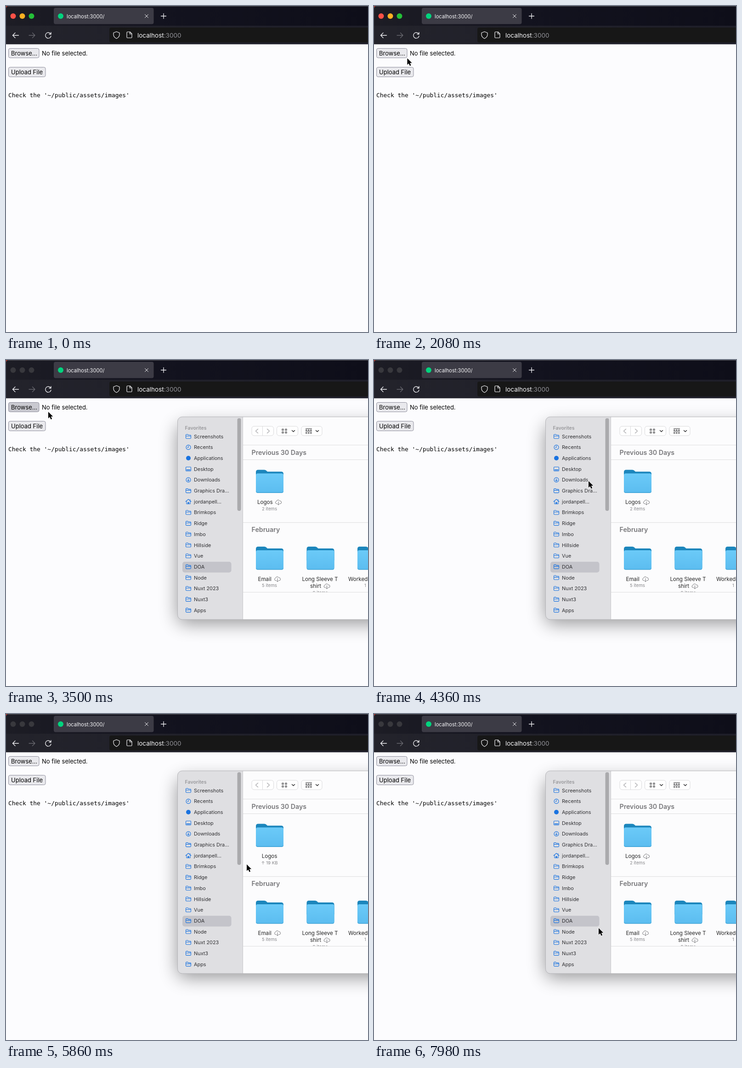
These frames come from a looping animation (788x711 px, 8 s). An HTML page:

```html
<!DOCTYPE html>
<html lang="en">
<head>
<meta charset="utf-8">
<title>File upload</title>
<style>
  html, body { margin: 0; width: 100%; height: 100%; overflow: hidden; background: #fcfcfe; }
  svg { display: block; width: 788px; height: 711px; font-family: Inter, "Open Sans", sans-serif; }
  text { white-space: pre; }
  .line { fill: none; stroke-linecap: round; stroke-linejoin: round; }
  .button { fill: #e9e9ed; stroke: #8f8f9d; }
  .label { font-size: 11.6px; fill: #262626; }
  .detail { font-size: 9.6px; fill: #858588; text-anchor: middle; }
  .heading { font-size: 14.2px; font-weight: 600; fill: #77777a; }
  .blue { stroke: #1a73e0; stroke-width: 1.1; }
  .rule { stroke: #dededf; }
</style>
</head>
<body>
<svg viewBox="0 0 788 711" xmlns="http://www.w3.org/2000/svg">
  <defs>
    <linearGradient id="strip"><stop stop-color="#1d1d25"/><stop offset=".4" stop-color="#13131f"/><stop offset="1" stop-color="#0e0e19"/></linearGradient>
    <linearGradient id="toolbar"><stop stop-color="#23232b"/><stop offset="1" stop-color="#1e1e29"/></linearGradient>
    <linearGradient id="front" x2="0" y2="1"><stop stop-color="#6bcaf8"/><stop offset="1" stop-color="#5cbdf0"/></linearGradient>
    <filter id="shadow" x="-30%" y="-30%" width="160%" height="170%"><feGaussianBlur stdDeviation="20"/></filter>
    <clipPath id="panelClip"><rect x="373.5" y="124" width="520" height="442" rx="10"/></clipPath>
    <clipPath id="listClip"><rect x="516" y="218" width="272" height="288"/></clipPath>
    <g id="folder">
      <path d="M0 5Q0 0 5 0H18Q21 0 23 2L25 4H55Q60 4 60 9V30H0Z" fill="#1c86bc"/>
      <rect y="8" width="60" height="42.5" rx="4" fill="#3ba2d6"/>
      <rect y="8" width="60" height="41" rx="4" fill="url(#front)"/>
    </g>
    <g id="cloud" class="line" stroke="#77777a">
      <path d="M4 9.5H3A2.7 2.7 0 0 1 2.6 4.2A4 4 0 0 1 10 3.4A3 3 0 0 1 11 9.5H10M7 5V12M5 10L7 12L9 10"/>
    </g>
    <g id="smallFolder" class="line blue">
      <path d="M-5.5 3.5V-3Q-5.5 -4.5 -4 -4.5H-1.5L0 -3H4Q5.5 -3 5.5 -1.5V3Q5.5 4.5 4 4.5H-4Q-5.5 4.5 -5.5 3ZM-5.5 -.7H5.5"/>
    </g>
    <g id="clock" class="line blue"><circle r="5"/><path d="M0 -3V.3H-2.5"/></g>
    <circle id="apps" r="5" fill="#1a73e0"/>
    <g id="desktop" class="line blue"><rect x="-5.5" y="-4.5" width="11" height="9" rx="1.5"/><path d="M-3.5 2H3.5" stroke-width="2"/></g>
    <g id="download" class="line blue"><circle r="5"/><path d="M0 -2.5V2.5M-2 .7L0 2.6L2 .7"/></g>
    <g id="home" class="line blue"><path d="M-6 0L0 -5L6 0M-4 -1V5H4V-1M3.7 -2V-4.5"/><path d="M-1 5V1.5H1V5" fill="#1a73e0"/></g>
  </defs>

  <rect width="788" height="711" fill="#fcfcfe"/>

  <g id="browser">
    <rect width="788" height="43" fill="url(#strip)"/>
    <rect y="43" width="788" height="40.5" fill="url(#toolbar)"/>
    <path d="M0 .5H788" stroke="#55555a"/>
    <path d="M0 0H5Q1 1 0 5Z" fill="#a33a35"/>
    <g id="lights"><circle cx="15.5" cy="22" r="6"/><circle cx="35.5" cy="22" r="6"/><circle cx="55.5" cy="22" r="6"/></g>
    <rect x="104" y="4" width="217.5" height="35.5" rx="4" fill="#3c3b45"/>
    <circle cx="119" cy="22" r="6" fill="#00d47e"/>
    <text x="132" y="26.5" font-size="11.1" fill="#f8f8fa">localhost:3000/</text>
    <g class="line" stroke="#f2f2f5" stroke-width="1.3">
      <path d="M302.5 18.5L309.5 25.5M309.5 18.5L302.5 25.5" stroke-width="1"/>
      <path d="M337.5 22H348.5M343 16.5V27.5"/>
      <path d="M27.5 64H14.5M20 58.5L14.5 64L20 69.5"/>
      <path d="M50 64H63M57.500 58.5L63 64L57.500 69.5" stroke="#68686f"/>
      <path d="M97.3 61A6.2 6.2 0 1 0 98 65.500M98 57.5V61.5H94"/>
    </g>
    <rect x="225" y="47" width="570" height="32.5" rx="4" fill="#171717"/>
    <g class="line" stroke="#f0f0f2" stroke-width="1.2">
      <path d="M240.500 56L247 58.5V63Q246.500 68 240.500 71Q234.500 68 234 63V58.500Z"/>
      <path d="M264.500 56.500H270L274 60.500V68Q274 69.500 272.500 69.500H264.500Q263 69.500 263 68V58Q263 56.500 264.500 56.500ZM269.500 57V61H273.500"/>
    </g>
    <text x="286" y="68.5" font-size="13.5" fill="#f8f8fa">localhost<tspan fill="#929298">:3000</tspan></text>
  </g>

  <g id="page" font-size="13" fill="#000">
    <rect id="browse" class="button" x="5.500" y="92.500" width="66.500" height="20.500" rx="3.5"/>
    <text x="11" y="107.500">Browse...</text>
    <text x="78" y="107.500">No file selected.</text>
    <rect class="button" x="5.500" y="133.500" width="80.500" height="21" rx="3.5"/>
    <text x="11" y="149">Upload File</text>
    <text x="5" y="199" font-family="'DejaVu Sans Mono', monospace" font-size="12.9">Check the '~/public/assets/images'</text>
  </g>

  <g id="dialog">
    <rect x="374" y="142" width="520" height="432" rx="12" fill="#000" opacity=".42" filter="url(#shadow)"/>
    <g clip-path="url(#panelClip)">
      <rect x="373" y="124" width="143" height="442" fill="#dfdfe2"/>
      <rect x="516" y="124" width="380" height="442" fill="#fcfcfd"/>
      <path d="M515.500 124V566" stroke="#c9c9cb"/>
      <rect x="503.500" y="127" width="8" height="202" rx="4" fill="#aaaaad"/>
      <text x="389.500" y="152" font-size="10.6" font-weight="600" fill="#98989b">Favorites</text>
      <rect x="384" y="440" width="106.500" height="23.500" rx="5" fill="#c4c4ca"/>
      <g id="sidebar" font-size="10.9" fill="#303033"></g>
      <path class="rule" d="M516 185.500H788M516 217.500H788M516 354.500H788M516 506.500H788"/>
      <g fill="#fff" stroke="#dadadc">
        <rect x="535" y="144.500" width="47.500" height="20.500" rx="5"/>
        <rect x="589.500" y="144.500" width="46" height="20.500" rx="5"/>
        <rect x="643" y="144.500" width="45" height="20.500" rx="5"/>
        <path d="M558.500 145V165"/>
      </g>
      <g class="line" stroke="#3c3c3e" stroke-width="1.3">
        <path d="M548.500 150.500L543.500 155L548.500 159.500M568.500 150.500L573.500 155L568.500 159.500" stroke="#a8a8ab"/>
        <path d="M622.500 153.500L625.500 156.500L628.500 153.500M674.500 153.500L677.500 156.500L680.500 153.500" stroke-width="1.6"/>
        <path d="M601 150.500H604V153.500H601ZM608 150.500H611V153.500H608ZM601 156.500H604V159.500H601ZM608 156.500H611V159.500H608Z" stroke-width="1.1"/>
        <path d="M652.500 149.500H665.500M652.500 155.500H665.500" stroke-width="1"/>
        <path d="M653 152H655V153.500H653ZM658 152H660V153.500H658ZM663 152H665V153.500H663ZM653 158H655V160H653ZM658 158H660V160H658ZM663 158H665V160H663Z" stroke-width="1"/>
      </g>
      <text class="heading" x="534.500" y="207">Previous 30 Days</text>
      <g clip-path="url(#listClip)">
        <use href="#folder" x="544" y="239.500"/>
        <g id="idle">
          <text class="label" x="547" y="314">Logos</text>
          <use href="#cloud" x="586" y="304"/>
          <text class="detail" x="573.500" y="327.500">2 items</text>
        </g>
        <g id="syncing">
          <text class="label" x="573.500" y="314" text-anchor="middle">Logos</text>
          <text class="detail" x="573.500" y="327.500">↑ 19 KB</text>
        </g>
        <text class="heading" x="534.500" y="374.500">February</text>
        <use href="#folder" x="544" y="407"/>
        <use href="#folder" x="654.500" y="407"/>
        <use href="#folder" x="765" y="407"/>
        <text class="label" x="548.500" y="481.500">Email</text>
        <use href="#cloud" x="584" y="471.500"/>
        <text class="detail" x="573.500" y="495">5 items</text>
        <text class="label" x="644.500" y="481.500">Long Sleeve T</text>
        <text class="label" x="662" y="497">shirt</text>
        <use href="#cloud" x="691.500" y="487"/>
        <text class="detail" x="684" y="511">9 items</text>
        <text class="label" x="745" y="481.500">Worked</text>
        <text class="detail" x="782" y="495">1</text>
      </g>
    </g>
    <rect x="373.500" y="124" width="520" height="442" rx="10" fill="none" stroke="#b4b4b8"/>
  </g>

  <path id="cursor" d="M0 0V14.200L3.300 11.200L5.600 16.600L8.100 15.500L5.800 10.300H10.200Z" fill="#000" stroke="#fff" stroke-width="1.2" paint-order="stroke"/>
</svg>
<script>
const LOOP = 8000;
const $ = id => document.getElementById(id);

const favorites = [
  ["Screenshots"], ["Recents", "clock"], ["Applications", "apps"], ["Desktop", "desktop"],
  ["Downloads", "download"], ["Graphics Dra..."], ["jordanpell...", "home"], ["Brimkops"],
  ["Ridge"], ["Imbo"], ["Hillside"], ["Vue"], ["DOA"], ["Node"], ["Nuxt 2023"], ["Nuxt3"], ["Apps"]
];
$("sidebar").innerHTML = favorites.map(([name, icon = "smallFolder"], i) => {
  const y = 166.7 + i * 23.68;
  return `<use href="#${icon}" x="397" y="${y}"/><text x="409" y="${y + 4}">${name}</text>`;
}).join("");

// Pointer stops: time, x, y
const stops = [
  [680, -14, 240], [840, 16, 227], [1100, 136, 165], [1280, 113, 130], [1560, 93, 119],
  [1900, 84, 120], [2300, 57, 106], [3460, 57, 106], [3500, 92, 113], [4140, 467, 264],
  [4500, 467, 264], [5300, 524, 328], [6500, 524, 328], [7500, 489, 467], [LOOP, 489, 467]
];
const lightColors = ["#ff5147", "#ffb022", "#24c038"];

const clamp = v => Math.min(1, Math.max(0, v));
const ease = v => v * v * (3 - 2 * v);
const between = (t, start, end) => t >= start && t < end;
const show = (id, visible) => $(id).setAttribute("visibility", visible ? "visible" : "hidden");

function pointerAt(t) {
  const next = Math.max(1, stops.findIndex(s => s[0] > t));
  const [t0, x0, y0] = stops[next - 1], [t1, x1, y1] = stops[next];
  const k = ease(clamp((t - t0) / (t1 - t0)));
  return [x0 + (x1 - x0) * k, y0 + (y1 - y0) * k];
}

function draw(t) {
  const [x, y] = pointerAt(t);
  $("cursor").setAttribute("transform", `translate(${x} ${y})`);
  show("cursor", t >= stops[0][0]);

  const opening = clamp((t - 2900) / 140);
  $("dialog").setAttribute("opacity", opening);
  [...$("lights").children].forEach((light, i) =>
    light.setAttribute("fill", opening > 0 ? "#38383d" : lightColors[i]));
  $("browse").style.fill = between(t, 2150, 3560) ? "#c9c9d0" : "";

  const syncing = between(t, 5500, 6500);
  show("syncing", syncing);
  show("idle", !syncing);
}

function tick() {
  draw(performance.now() % LOOP);
  requestAnimationFrame(tick);
}
tick();
</script>
</body>
</html>
```
